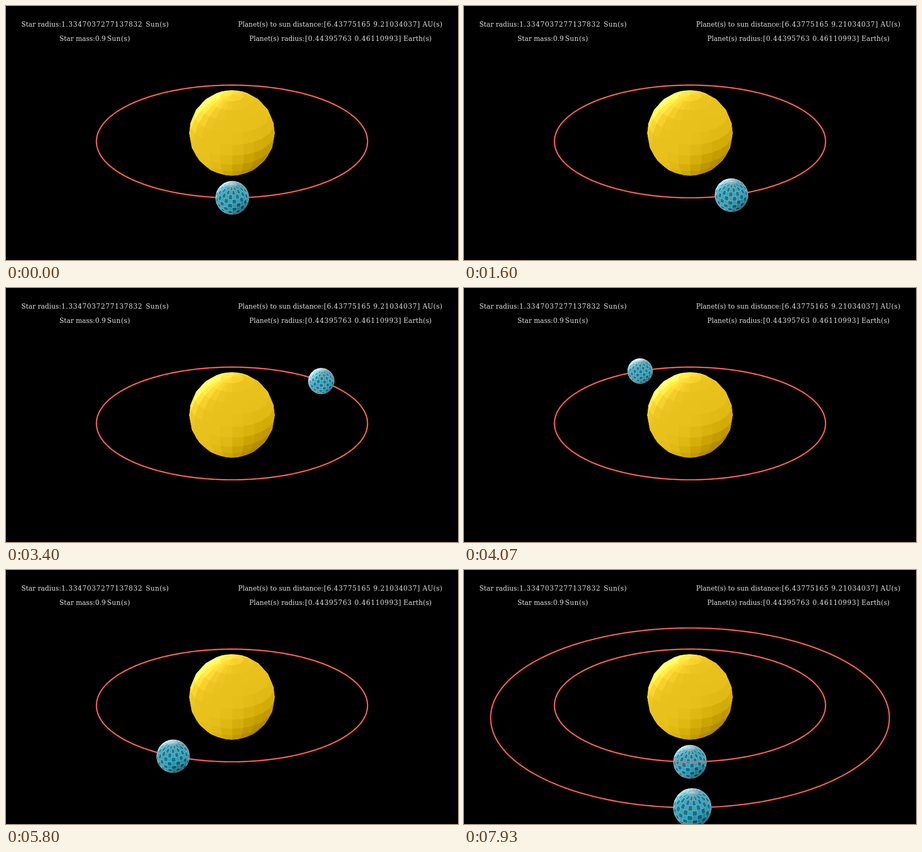
An HTML page with a canvas that plays this animation: 854x480 px, repeating every 8000 ms.

```html
<!DOCTYPE html>
<html lang="en">
<head>
<meta charset="utf-8">
<title>Planet orbits</title>
<style>
html, body { margin: 0; width: 100%; height: 100%; overflow: hidden; background: #000; }
canvas { display: block; }
</style>
</head>
<body>
<canvas id="stage" width="854" height="480"></canvas>
<script>
const ctx = document.getElementById('stage').getContext('2d');
const { PI, sin, cos, exp, hypot, floor } = Math;
const TAU = 2 * PI;

const LOOP = 8000, FPS = 15;
const UNIT = 60, FOCAL = 20, TILT = PI / 3;
const LIGHT = [-7, -9, 10];
const CAMERA = [FOCAL * sin(TILT), 0, FOCAL * cos(TILT)];
const ROWS = 12, COLS = 24;

const YELLOW = [232, 193, 28];
const BLUES = [[28, 117, 138], [41, 171, 202]];
const GREY = [187, 187, 187];

// rx points to the viewer, ry to the right; times are in seconds
const inner = { rx: 3.468, ry: 4.22, radius: 0.44395763, start: -0.03, duration: 7.73 };
const outer = { rx: 5.355, ry: 6.107, radius: 0.46110993, start: 7.7, duration: 11 };
const sun = { radius: 1.3347037 };

const sub = (a, b) => a.map((v, i) => v - b[i]);
const dot = (a, b) => a[0] * b[0] + a[1] * b[1] + a[2] * b[2];
const normalize = a => { const n = hypot(...a); return a.map(v => v / n); };
const rgb = (color, shade) => `rgb(${color.map(v => Math.round(v + 255 * shade))})`;

function project([x, y, z]) {
  const depth = x * sin(TILT) + z * cos(TILT);
  const up = z * sin(TILT) - x * cos(TILT);
  const scale = UNIT * FOCAL / (FOCAL - depth);
  return [427 + y * scale, 240 - up * scale];
}

function tracePolygon(points) {
  ctx.beginPath();
  points.forEach(p => ctx.lineTo(...project(p)));
  ctx.closePath();
}

function shadeAt(point, normal) {
  const factor = 0.5 * dot(normal, normalize(sub(LIGHT, point))) ** 3;
  return factor < 0 ? factor / 2 : factor;
}

function drawSphere(center, radius, fills, line, lineWidth) {
  const onSphere = (row, col) => {
    const u = row / ROWS * PI, v = col / COLS * TAU;
    return [
      center[0] + radius * sin(u) * cos(v),
      center[1] + radius * sin(u) * sin(v),
      center[2] + radius * cos(u)
    ];
  };
  const faces = [];
  for (let i = 0; i < ROWS; i++) {
    for (let j = 0; j < COLS; j++) {
      const middle = onSphere(i + 0.5, j + 0.5);
      const normal = normalize(sub(middle, center));
      faces.push({
        corners: [onSphere(i, j), onSphere(i + 1, j), onSphere(i + 1, j + 1), onSphere(i, j + 1)],
        fill: fills[(i + j) % fills.length],
        shade: shadeAt(middle, normal),
        facing: dot(normal, sub(CAMERA, middle))
      });
    }
  }
  faces.sort((a, b) => a.facing - b.facing);

  ctx.lineWidth = lineWidth;
  ctx.lineJoin = 'round';
  for (const { corners, fill, shade } of faces) {
    tracePolygon(corners);
    ctx.fillStyle = rgb(fill, shade);
    ctx.strokeStyle = rgb(line, shade);
    ctx.fill();
    ctx.stroke();
  }
}

const pointOn = (orbit, angle) => [orbit.rx * cos(angle), orbit.ry * sin(angle), 0];

function drawOrbit(orbit) {
  tracePolygon(Array.from({ length: 240 }, (_, i) => pointOn(orbit, i / 240 * TAU)));
  ctx.strokeStyle = '#fc6255';
  ctx.lineWidth = 2.4;
  ctx.stroke();
}

// Sigmoid easing, normalized to run from 0 to 1
function smooth(t) {
  const sigmoid = x => 1 / (1 + exp(-x));
  const edge = sigmoid(-5);
  return (sigmoid(10 * (t - 0.5)) - edge) / (1 - 2 * edge);
}

// Travelled share of the orbit's length to ellipse angle
function angleAt(orbit, share) {
  const skew = (orbit.ry - orbit.rx) / (orbit.ry + orbit.rx) / 2;
  let angle = share * TAU;
  for (let i = 0; i < 6; i++) angle = share * TAU - skew * sin(2 * angle);
  return angle;
}

function drawPlanet(orbit, time) {
  const progress = Math.min(1, Math.max(0, (time - orbit.start) / orbit.duration));
  const center = pointOn(orbit, angleAt(orbit, smooth(progress)));
  drawSphere(center, orbit.radius, BLUES, GREY, 0.5);
}

const LABELS = [
  [29, 39, 'Star radius:'], [104.5, 39, '1.3347037277137832', 0.8], [264, 39, 'Sun(s)', 0.5],
  [101, 66, 'Star mass:'], [168.5, 66, '0.9'], [191, 66, 'Sun(s)', 0.5],
  [438.5, 39, 'Planet(s) to sun distance:'], [600.5, 39, '[6.43775165 9.21034037]', 0.75], [787, 39, 'AU(s)', 0.4],
  [459.5, 66, 'Planet(s) radius:'], [565, 66, '[0.44395763 0.46110993]', 0.75], [751, 66, 'Earth(s)', 0.2]
];

function drawLabels() {
  ctx.font = '12.5px "DejaVu Serif", serif';
  ctx.fillStyle = '#e4e4e4';
  for (const [x, y, text, spacing = 0] of LABELS) {
    ctx.letterSpacing = spacing + 'px';
    ctx.fillText(text, x, y);
  }
}

function draw(time) {
  ctx.fillStyle = '#000';
  ctx.fillRect(0, 0, 854, 480);
  drawLabels();
  drawSphere([0, 0, 0], sun.radius, [YELLOW], YELLOW, 1);
  // The moving planet is always on top; a resting one lies under the orbit lines
  if (time < outer.start) {
    drawOrbit(inner);
    drawPlanet(inner, time);
  } else {
    drawPlanet(inner, time);
    drawOrbit(inner);
    drawOrbit(outer);
    drawPlanet(outer, time);
  }
}

const startTime = performance.now();
function tick() {
  const elapsed = (performance.now() - startTime) % LOOP;
  draw(floor((elapsed + 4) * FPS / 1000) % (LOOP * FPS / 1000) / FPS);
  requestAnimationFrame(tick);
}
tick();
</script>
</body>
</html>
```
